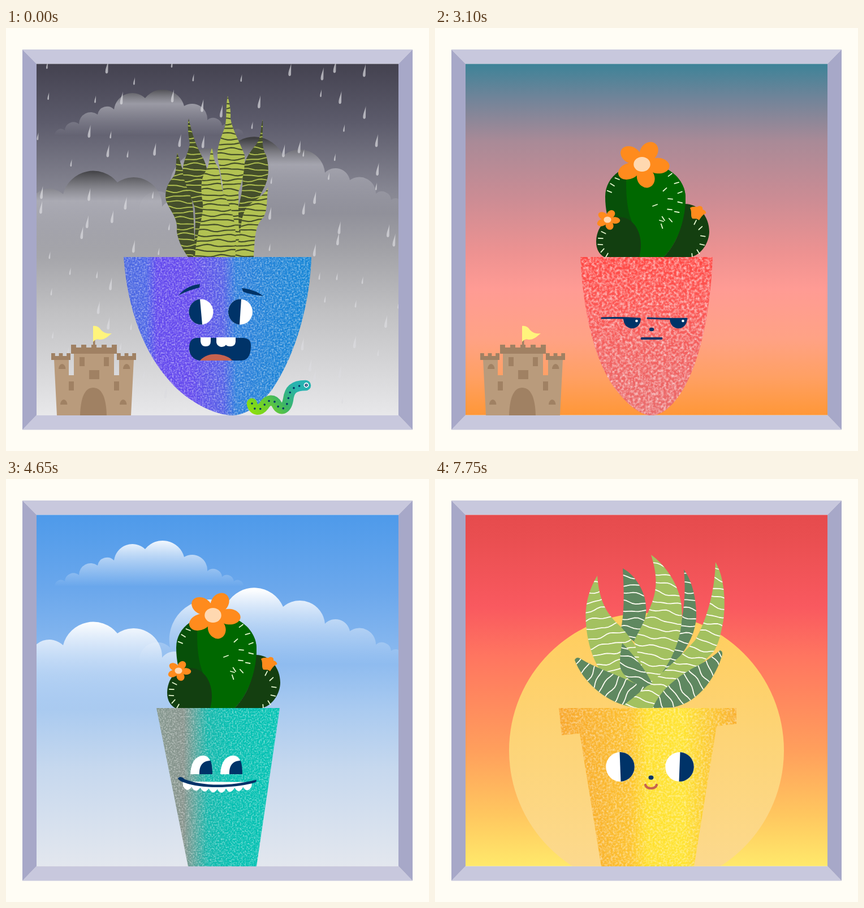
Recreate the animation shown at these times as an HTML page. Size 748x748 px, loop 9300 ms.

```html
<!DOCTYPE html>
<html lang="en">
<head>
<meta charset="utf-8">
<title>Plant pots</title>
<style>
html, body { margin: 0; width: 100%; height: 100%; overflow: hidden; background: #fffdf5; }
svg { display: block; width: 100vw; height: 100vh; }
</style>
</head>
<body>
<svg id="stage" viewBox="0 0 748 748"></svg>
<script>
const HOLD = 1550, NAVY = '#003368', RED = '#c7624f';
let defs = '';

const path = (d, fill) => `<path d="${d}" fill="${fill}"/>`;
const line = (d, color, w, extra = '') =>
  `<path d="${d}" fill="none" stroke="${color}" stroke-width="${w}" stroke-linecap="round" stroke-linejoin="round" ${extra}/>`;
const dot = (x, y, r, fill, ry = r) => `<ellipse cx="${x}" cy="${y}" rx="${r}" ry="${ry}" fill="${fill}"/>`;
const move = (t, s) => `<g transform="${t}">${s}</g>`;
const repeat = (n, f) => Array.from({ length: n }, (_, i) => f(i)).join('');

function random(seed) {
  return () => {
    seed = seed + 0x6D2B79F5 | 0;
    let t = Math.imul(seed ^ seed >>> 15, seed | 1);
    t ^= t + Math.imul(t ^ t >>> 7, t | 61);
    return ((t ^ t >>> 14) >>> 0) / 4294967296;
  };
}

// stops: "color offset opacity, ..."
function grad(id, x1, y1, x2, y2, stops) {
  const list = stops.split(',').map(s => {
    const [c, o, a = 1] = s.trim().split(' ');
    return `<stop offset="${o}" stop-color="${c}" stop-opacity="${a}"/>`;
  }).join('');
  defs += `<linearGradient id="${id}" gradientUnits="userSpaceOnUse" x1="${x1}" y1="${y1}" x2="${x2}" y2="${y2}">${list}</linearGradient>`;
  return `url(#${id})`;
}

const sky = (id, stops) => `<rect x="54" y="63" width="640" height="622" fill="${grad(id, 0, 64, 0, 685, stops)}"/>`;

// Pot with a soft chalky speckle
function pot(id, d, fill, freq, gain, mean) {
  defs += `<filter id="${id}" x="0" y="0" width="1" height="1" color-interpolation-filters="sRGB">
    <feTurbulence type="fractalNoise" baseFrequency="${freq}" numOctaves="3" seed="4"/>
    <feColorMatrix values="0 0 0 0 1 0 0 0 0 1 0 0 0 0 1 ${gain} 0 0 0 ${mean - gain / 2}"/>
    <feComposite in2="SourceAlpha" operator="in" result="n"/>
    <feMerge><feMergeNode in="SourceGraphic"/><feMergeNode in="n"/></feMerge></filter>`;
  return `<path d="${d}" fill="${fill}" filter="url(#${id})"/>`;
}

// Leaf with wavy stripes across it
let leaves = 0;
function leaf(d, fill, stripe, gap, w, amp, angle = 0) {
  const id = 'leaf' + leaves++;
  defs += `<clipPath id="${id}"><path d="${d}"/></clipPath>`;
  let s = '';
  for (let y = 70, row = leaves; y < 480; y += gap, row++) {
    for (let x = 170; x <= 580; x += 6) {
      const v = y + amp * (Math.sin(x * .1 + row * 1.7) + .5 * Math.sin(x * .19 - row * 2.3));
      s += `${x === 170 ? 'M' : 'L'}${x} ${v.toFixed(1)}`;
    }
  }
  return path(d, fill) + `<g clip-path="url(#${id})">${line(s, stripe, w, `transform="rotate(${angle} 375 290)"`)}</g>`;
}

// Five petals round a pale heart
function flower(x, y, r, color, heart, squash = 1) {
  const petals = repeat(5, i => move(`rotate(${78 + i * 72})`, dot(r * .6, 0, r * .44, color, r * .34)));
  return move(`translate(${x} ${y}) scale(1 ${squash})`, petals + dot(0, 0, r * .45, color) + dot(-1, 0, r * .32, heart));
}

// Cloud outline: a round bump over each pair of key points
function puffs(points, foot) {
  const p = points.split(' ').map(s => s.split(',').map(Number));
  return `M${p[0]}` + p.slice(1).map((q, i) => {
    const r = (Math.hypot(q[0] - p[i][0], q[1] - p[i][1]) * .56).toFixed(1);
    return `A${r} ${r} 0 0 1 ${q}`;
  }).join('') + foot;
}

function clouds(id, near, far, mid) {
  const fill = (n, y1, y2) => grad(id + n, 0, y1, 0, y2, `${near} 0, ${far} ${mid}, ${far.split(' ')[0]} 1 0`);
  return path(puffs('86,189 104,181 129,170 162,153 191,144 246,124 315,138 356,163 382,173 403,181 420,189', 'Z'), fill(1, 104, 190)) +
    path(puffs('236,316 290,298 391,220 490,226 564,256 608,269 654,293 681,304 702,314', 'V330H236Z'), fill(2, 195, 328)) +
    path(puffs('42,314 101,294 197,273 276,316 325,325', 'L380 410H42Z'), fill(3, 251, 408));
}

function rain() {
  const rnd = random(12), cols = 10;
  return `<g opacity=".7">${repeat(120, i => {
    const x = 54 + (i % cols + rnd()) * 64, y = 62 + (Math.floor(i / cols) + rnd()) * 50, k = rnd() < .5 ? 1 : .58;
    return move(`translate(${x.toFixed(1)} ${y.toFixed(1)}) scale(${k})`, path('M2.5-12C1.5-5-2.5 1-2.5 8C-2.5 12 2 12 2.2 8Z', '#dcdce0'));
  })}</g>`;
}

function stars() {
  const rnd = random(7);
  return repeat(72, i => dot((60 + rnd() * 630).toFixed(1), (72 + rnd() * 570).toFixed(1), i % 4 ? 1.1 : 2.3, '#4aa3d0'));
}

// Props
function castle() {
  const dark = '#a08163';
  const box = (x, y, w, h) => `M${x} ${y}h${w}v${h}h${-w}z`;
  const arch = (x, y) => `M${x} ${y}a6.2 9 0 0 1 12.4 0z`;
  const wall = (x, y, w, n, h) => box(x, y + 5, w, h - 5) + repeat(n, i => box(x + i * 2 * w / (2 * n - 1), y, w / (2 * n - 1), 6));
  return path(box(154, 548, 3.5, 14), dark) +
    path('M154 527C160 526 165 529 168 534C174 540 180 541 187 540C180 546 173 552 165 551C160 549 157 552 154 555Z', '#fff47c') +
    path('M90 685L85 586H111V614H120V574H191V614H200V586H226L221 685Z', '#b99b7c') +
    `<g fill="${dark}">` + [wall(80, 575, 34, 3, 12), wall(196, 575, 34, 3, 12), wall(115, 560, 81, 5, 16),
      box(130, 582, 9, 16), box(173, 582, 9, 16), box(147, 605, 18, 16), box(111, 625, 9, 16), box(191, 625, 9, 16),
      arch(93, 603), arch(207, 603), arch(96, 666), arch(201, 666),
      'M131 685C132 650 141 636 154 636C168 636 177 650 178 685Z'].map(d => `<path d="${d}"/>`).join('') + '</g>';
}

function clock() {
  const lilac = '#c79cf5', purple = '#6a35cc', ruby = '#b01f46';
  const side = line('M116 553L124 562', lilac, 9) + dot(99.5, 529.5, 3.5, lilac) +
    path('M95 568L137 540C128 524 108 522 96 534C87 543 88 557 93 566Q94 568 95 568Z', '#faf592') +
    path('M108 658L123 668L111 683Q107 687 105 682Z', lilac);
  return side + move('translate(310 0) scale(-1 1)', side) +
    line('M155 540V552', lilac, 4) + line('M151 538H159', purple, 6) +
    dot(155, 615, 66.5, purple) + dot(155, 615, 54, '#fff') +
    repeat(12, i => move(`rotate(${i * 30} 155 615)`, i % 3 ? line('M155 574V578', ruby, 2.3) : dot(155, 573, 3.6, ruby))) +
    line('M154.5 615V640M155 615L181 598', ruby, 4) + dot(154.5, 615, 7.5, ruby);
}

function spider() {
  const legs = line('M-11-10L-20-21L0-43M-7-14L-17-19L0-34M-16 4H-30L-34-17M-13 10L-26 22L-39 10', '#07305f', 2.2);
  return line('M203-2C206 40 202 66 200 105C198 150 198 180 197 242', '#07305f', 1.8) +
    move('translate(197 255)', legs + move('scale(-1 1)', legs) + dot(0, 18, 7, '#b8496f', 5.5) +
      dot(0, 0, 17, grad('bug', -17, 0, 17, 0, '#1c3a9c 0, #3b55c4 1'), 15) +
      dot(0, -9, 2.8, '#fff') + dot(-9, -3, 2.8, '#fff') + dot(9, -3, 2.8, '#fff') + dot(0, 5, 4, '#fff'));
}

function worm() {
  const d = 'M435 664C437 677 449 678 456 668C463 656 474 656 479 666C485 678 496 675 499 657C501 640 508 632 530 632';
  return line(d, grad('worm', 440, 690, 508, 628, '#90e00c 0, #6fd02a .3, #3db565 .6, #27b3b0 1'), 18.5) +
    line(d, NAVY, 3.6, 'stroke-dasharray="0 10.5"') +
    dot(531, 631.5, 6, '#2ab5b5') + dot(531, 631.5, 4.4, '#fff') + dot(531, 631.5, 2.6, NAVY) + dot(531, 631.5, 1, '#fff');
}

// Plants
function snakePlant() {
  const lime = '#b2c252', moss = '#454f2b';
  const dark = d => leaf(d, moss, lime, 9.5, 1.9, 1.8);
  const light = d => leaf(d, lime, moss, 9, 2.2, 1.6);
  return dark('M303 221C299 235 303 250 297 262C285 275 280 290 283 305C290 325 305 335 302 360C305 380 315 395 322 405H338C330 380 335 340 328 300C325 265 312 255 309 240Z') +
    dark('M323 160C320 175 323 190 325 205C322 225 311 235 313 258C318 285 330 300 334 320C336 350 333 380 331 405H362L352 300C360 270 358 245 346 226C337 210 328 185 323 160Z') +
    dark('M454 162C449 178 453 190 443 205C427 225 420 235 418 262C420 290 412 310 408 330L400 405H420C430 340 440 315 455 285C468 262 464 240 460 225C450 210 455 185 454 162Z') +
    light('M392 120C388 140 391 160 387 175C380 195 373 210 374 228C378 250 383 270 384 290L394 405H420C408 360 412 320 411 290C420 265 423 245 422 225C415 205 400 180 397 160C398 145 395 132 392 120Z') +
    light('M464 281C455 300 435 305 425 318C412 340 418 360 410 380L405 405H438C440 370 440 350 455 335C464 320 460 300 464 281Z') +
    light('M364 212C358 230 362 240 352 255C343 270 345 290 348 310C350 335 338 355 334 405H405C408 370 408 330 385 295C378 270 380 250 371 240C366 230 367 222 364 212Z');
}

function aloe() {
  const light = (d, a) => leaf(d, '#a3c160', '#fffdf2', 16, 1.8, 2.2, a);
  const dark = (d, a) => leaf(d, '#5f8860', '#fffdf2', 15, 1.8, 2.2, a);
  return dark('M332 158C355 170 372 200 373 225C376 250 360 275 355 290L328 268C336 235 334 190 332 158Z', 4) +
    dark('M440 160C455 180 463 215 462 245C460 275 445 300 425 325L385 362C410 335 430 290 436 250C442 220 443 190 440 160Z', 8) +
    light('M287 171C272 195 264 225 267 255C269 290 280 318 289 333L345 385L372 330C352 285 335 268 325 258C300 235 290 210 287 171Z', -12) +
    light('M382 134C405 150 432 185 436 225C440 270 425 310 400 345L380 362C365 330 355 300 352 286C365 262 378 235 385 215C395 185 390 160 382 134Z', 10) +
    dark('M247 320Q250 314 256 317C285 335 320 345 350 360Q372 368 382 362C375 380 365 390 360 405C305 400 262 360 247 320Z', -58) +
    light('M496 147C512 175 514 215 510 250C505 275 502 292 492 306L395 405H354L334 400C360 380 430 320 460 285C480 250 495 200 496 147Z', 14) +
    dark('M331 290C350 310 375 340 384 362L370 368C350 362 325 345 327 325C327 312 329 300 331 290Z', 18) +
    dark('M504 303Q509 304 508 311C498 345 470 395 420 404L385 405C400 370 430 350 455 335C475 325 490 315 504 303Z', 58);
}

function cactus() {
  const orange = '#ff8b1d', cream = '#ffd8b0', rnd = random(5);
  const right = 'C425 385 443 345 443 300C443 268 412 240 372 240';
  // Needles pointing outwards along part of an oval, angles in degrees
  const needles = (x, y, rx, ry, from, to, n) => repeat(n, i => {
    const a = from + (to - from) * i / (n - 1), t = a * Math.PI / 180;
    const at = `translate(${(x + rx * Math.cos(t)).toFixed(1)} ${(y + ry * Math.sin(t)).toFixed(1)})`;
    return move(`${at} rotate(${(a + rnd() * 40 - 20).toFixed(0)})`, line('M-4 0H4', '#e6f8d0', 1.8));
  });
  return path('M442 311C466 311 485 333 485 360C485 380 470 402 452 405H404C430 380 440 340 442 311Z', '#143f10') +
    path(`M404 405${right}C335 240 301 262 301 298C301 345 320 380 345 405Z`, '#075009') +
    path(`M404 405${right}C358 240 347 246 339 252C336 290 340 330 352 350L360 405Z`, '#006800') +
    path('M361 405C371 370 355 334 325 334C300 334 285 355 285 378C285 392 291 400 299 405Z', '#123f10') +
    needles(372, 300, 62, 57, -45, 62, 7) + needles(372, 310, 45, 38, -40, 45, 4) + needles(372, 300, 65, 52, 192, 220, 3) +
    needles(448, 372, 26, 32, -62, 75, 6) + needles(325, 379, 33, 30, 130, 215, 5) +
    line('M385 315l8-3M397 340l7 2', '#e6f8d0', 1.8) +
    flower(367, 241, 46, orange, cream, .88) + flower(306, 339, 20.5, orange, cream, .85) +
    path('M451 318C458 314 463 318 466 315C472 314 474 318 473 321C478 322 480 326 479 328C474 329 471 334 467 340C463 336 459 338 455 337C451 332 455 326 451 318Z', orange);
}

function ballCactus() {
  const pink = '#ff1477', pale = '#ffd9ec';
  // Thorns spread evenly over the ball
  const thorns = repeat(56, i => {
    const a = i * 137.5, r = 84 * Math.sqrt((i + 1) / 56), t = a * Math.PI / 180;
    const x = 377 + r * Math.cos(t), y = 328 + r * Math.sin(t);
    return y > 402 ? '' : move(`translate(${x.toFixed(1)} ${y.toFixed(1)}) rotate(${a % 360})`, path('M-3-1.6L5 0L-3 1.6Z', '#f4fff8'));
  });
  const stripes = ['M331 259C308 275 300 300 303 330C302 360 312 385 330 399L344 405C325 385 318 360 322 335C327 310 322 290 331 259Z',
    'M343 256C366 262 364 285 360 305C358 330 375 350 375 375Q374 395 381 405H360C340 385 355 360 348 330C335 310 340 280 343 256Z',
    'M380 265C376 290 395 300 398 325C402 350 390 370 391 405H406C415 390 425 360 415 330C410 300 395 290 394 265Z',
    'M407 258C420 280 425 300 430 320C432 350 420 380 413 404C435 390 445 365 446 335C448 305 430 280 418 260Z',
    'M432 266C445 285 455 305 455 330C455 345 450 360 448 368C458 350 462 335 460 318C456 298 446 280 432 266Z'];
  return path('M342 405C312 392 293 363 293 330C293 282 331 245 377 245C423 245 461 282 461 330C461 363 442 392 412 405Z', '#2cb78c') +
    stripes.map(d => path(d, '#5ed3ae')).join('') + thorns +
    flower(372, 241, 34, pink, pale, .95) + flower(415, 261, 18.5, pink, pale, .92);
}

// Pots with faces
// Round eye with one dark half; lean slants the dividing line
function halfEye(x, y, r, ry, side, lean) {
  return dot(x, y, r, '#fff', ry) +
    path(`M${x - lean} ${y - ry}A${r} ${ry} 0 0 ${side > 0 ? 1 : 0} ${x + lean} ${y + ry}Z`, NAVY);
}

function worriedPot() {
  return pot('p1', 'M208 405H540C538 480 515 575 470 640C445 672 420 685 400 685C370 685 320 660 290 625C245 575 215 500 208 405Z',
    grad('blue', 208, 0, 540, 0, '#4a68e0 0, #4d66e6 .12, #6349ee .18, #6549ee .35, #5560e6 .53, #2f7fdc .6, #2383d8 .75, #1686d6 1'), .34, 1.1, .11) +
    path('M305 473C315 460 330 454 343 453L342 459C330 462 318 466 305 473ZM417 460C430 461 445 466 455 474C440 472 428 470 419 466Z', NAVY) +
    halfEye(345, 502, 21.5, 22.5, -1, 2) + halfEye(414.5, 502, 21.5, 22.5, -1, -1.5) +
    path('M337 548H420Q433 549 433 561C433 580 427 588 415 588H345C330 588 323 575 324 565Q324 549 337 548Z', NAVY) +
    path('M343 588C352 578 364 576 374 577C386 578 397 583 400 588Z', RED) +
    path('M344 547H362V554Q362 563 353 563Q345 563 344 554ZM372 547H406V555Q405 563 397 563Q390 563 389 560Q387 564 380 564Q373 562 372 556Z', '#fff');
}

function amazedPot() {
  return pot('p2', 'M273 405H475V685H303Z', grad('aqua', 300, 680, 546, 582, '#33cfe0 0, #52bee0 .17, #6ea4e0 .31, #50b2e0 .46, #1dd3dc .68, #14d6da 1'), .2, 1.5, .22) +
    line('M294 475Q306 467 325 467M434 467Q455 462 464 477', NAVY, 5) +
    line('M295 473L293 469M304 469L303 465M313 466L312 463M321 465V463M434 465V461M442 464V460M450 465V460M457 468L459 463M463 475L465 466', NAVY, 4.5) +
    dot(318.5, 491, 24, '#fff') + dot(309.5, 487, 6.5, NAVY) + dot(441, 488, 22.8, '#fff') + dot(437, 482, 7, NAVY) +
    path('M376.5 460L379 492L374.5 490Z', NAVY) + line('M377 491C384 497 386 503 381 508Q378 510 375 510', NAVY, 3.8) +
    path('M322 540C350 532 380 521 400 518C415 516 424 528 427 543C428 558 422 570 413 573C400 577 375 577 364 575C345 565 330 553 322 540Z', NAVY) +
    path('M350 566C358 552 375 543 392 543C408 546 420 556 423 566C416 575 405 576 390 576H368C361 573 355 570 350 566Z', RED);
}

function boredPot() {
  const eye = x => path(`M${x} 514h31c-1 23-30 23-31 0Z`, NAVY) + dot(x + 23.5, 518, 2.3, '#fff');
  return pot('p3', 'M257 405H491C487 500 470 590 435 645C415 675 398 685 382 685C362 685 335 662 313 630C280 580 262 500 257 405Z',
    grad('coral', 0, 405, 0, 685, '#ff4743 0, #fc5653 .3, #f2605f .6, #e96b6c 1'), .22, 1.4, .18) +
    line('M295 513Q330 512 362 514M376 513Q410 515 445 514', NAVY, 3.2) + eye(333) + eye(415) +
    dot(383, 533, 4.2, NAVY, 3.2) + line('M365.5 549H400.5', NAVY, 3.8);
}

function grinPot() {
  const eye = x => move(`translate(${x} 522)`, path('M0 0C1-22 10-33 24-33C36-32 38-17 38 0Z', '#fff') + path('M16 0C15-17 24-24 36-24Q39-14 39 0Z', NAVY));
  const teeth = repeat(8, i => `q7.5 13 15.2 ${i < 4 ? 1.4 : -1.4}`);
  return pot('p4', 'M266 405H484L443 685H322Z', grad('teal', 266, 0, 484, 0, '#85988f 0, #86938c .22, #5ba59c .31, #14b8ac .42, #06bfb1 .6, #04c3b4 1'), .36, 1.1, .1) +
    eye(326) + eye(379) + path(`M313 535V543${teeth}V536Z`, '#fff') +
    path('M304 530C306 525 312 527 316 531C345 542 390 545 442 532C445 535 440 537 436 538C400 547 345 548 316 537Q308 535 304 530Z', NAVY);
}

function happyPot() {
  return pot('p5', 'M219 405H533V433L498 437L458 685H294L256 450L224 453Z',
    grad('gold', 219, 0, 533, 0, '#f8a72c 0, #fab62e .25, #fdc22e .4, #ffe02e .5, #ffe433 .7, #fcc934 .85, #f9b030 1'), .27, 1.1, .12) +
    halfEye(327.5, 509, 25.3, 26, 1, 1) + halfEye(432.5, 509, 25.3, 26, 1, -1) +
    dot(382, 528, 4.5, NAVY, 3.7) + line('M372 541Q374 547 382 547Q390 547 392 541', RED, 4.2);
}

const sunset = id => sky(id, '#e64b4d 0, #e94e50 .06, #f9595f .26, #ff7560 .4, #ff9f5c .67, #ffc65f .85, #ffe96b 1') +
  dot(374, 480, 243, grad(id + 'sun', 0, 237, 0, 685, '#ffcd5c 0, #fdd477 .5, #fcd98d 1'));

// [backdrop inside the window, things in front]
const scenes = [
  [sky('storm', '#444250 0, #5c5b6b .165, #868692 .36, #a2a2a7 .53, #c0c0c2 .7, #e8e8ea 1') + clouds('grey', '#3e3e41', '#b8b8c0 .35', .7) + rain(),
    castle() + snakePlant() + worriedPot() + worm()],
  [sky('night', '#000001 0, #050b11 .18, #0a2739 .4, #08415f .57, #055688 .75, #0071b6 1') + stars(),
    spider() + clock() + cactus() + amazedPot()],
  [sky('dusk', '#3e8398 0, #728499 .1, #a98a97 .22, #cb8c94 .38, #ee9291 .54, #ff9b94 .64, #ffa285 .78, #ffa064 .89, #ff9737 1'),
    castle() + cactus() + boredPot()],
  [sky('day', '#4e9aea 0, #6ca8ec .22, #8ab9ef .4, #a9caf0 .55, #c6d8ee .72, #e3e7ee 1') + clouds('white', '#ffffff', '#d4e4f8 .6', .5),
    cactus() + grinPot()],
  [sunset('set1'), ballCactus() + amazedPot()],
  [sunset('set2'), aloe() + happyPot()]
];

const frame = path('M29 38H719L694 63.5H54ZM29 710.5H719L694 684.5H54Z', '#c8c8dd') +
  path('M29 38L54 63.5V684.5L29 710.5ZM719 38L694 63.5V684.5L719 710.5Z', '#a7a8c8');

const stage = document.getElementById('stage');
stage.innerHTML = `<defs>${defs}<clipPath id="pane"><path d="M54 63.5H694V684.5H54Z"/></clipPath></defs>
  <rect width="748" height="748" fill="#fffdf5"/>${frame}` +
  scenes.map(([back, front]) => `<g class="scene"><g clip-path="url(#pane)">${back}</g>${front}</g>`).join('');

const groups = [...stage.querySelectorAll('.scene')];
const start = performance.now();

function draw() {
  const now = Math.floor((performance.now() - start) / HOLD) % groups.length;
  groups.forEach((g, i) => g.style.display = i === now ? '' : 'none');
  requestAnimationFrame(draw);
}
draw();
</script>
</body>
</html>
```
